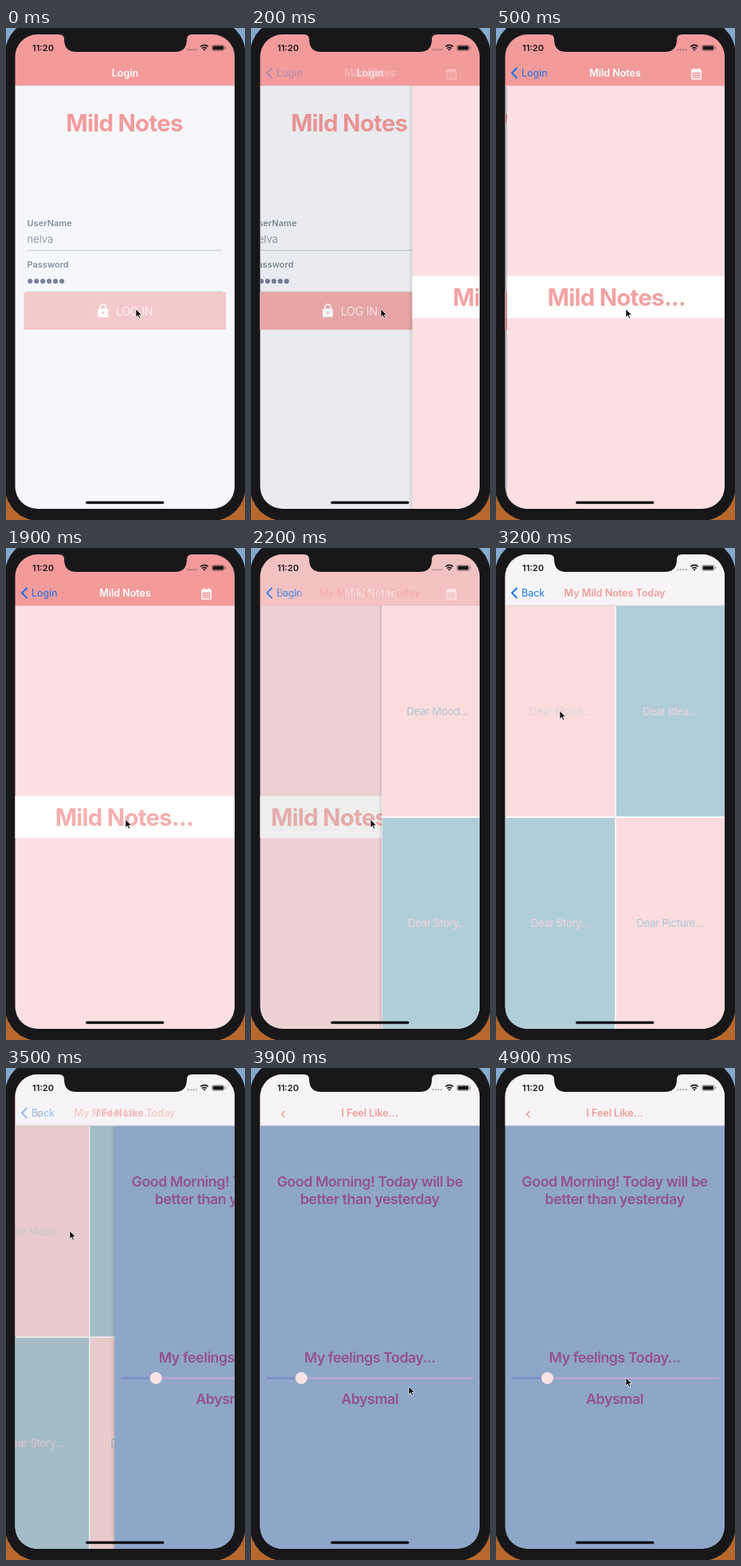
These frames come from a looping animation (300 by 618 pixels, 5 s). An HTML page:

```html
<!DOCTYPE html>
<html lang="en">
<head>
<meta charset="utf-8">
<title>Diary app</title>
<style>
html, body { margin: 0; width: 100%; height: 100%; overflow: hidden; background: #17171a; }
svg { display: block; width: 300px; height: 618px; font-family: Inter, "Liberation Sans", sans-serif; }
.mid { text-anchor: middle; }
.bold { font-weight: 600; }
.bar { font-size: 12.5px; }
.big { font-size: 29.4px; font-weight: 700; letter-spacing: -.025em; fill: #f39b9b; }
.label { font-size: 11px; font-weight: 600; fill: #82909c; }
.tile { font-size: 13.25px; letter-spacing: -.3px; text-anchor: middle; }
.feel { font-size: 17.8px; font-weight: 600; letter-spacing: -.024em; text-anchor: middle; fill: #935290; }
</style>
</head>
<body>
<svg viewBox="0 0 300 618">
  <defs>
    <linearGradient id="wall" x2="0" y2="1">
      <stop offset="0" stop-color="#86a9d0"/><stop offset=".5" stop-color="#665a60"/><stop offset="1" stop-color="#b9682c"/>
    </linearGradient>
    <linearGradient id="shade">
      <stop offset="0" stop-opacity="0"/><stop offset="1" stop-opacity=".12"/>
    </linearGradient>
    <clipPath id="screen"><rect x="11.5" y="8" width="275.5" height="596" rx="28"/></clipPath>
  </defs>

  <rect width="300" height="618" fill="url(#wall)"/>
  <rect x="-1" y="-10" width="301.5" height="629" rx="42" fill="#17171a"/>

  <g clip-path="url(#screen)">
    <g class="page">
      <rect x="11" y="72" width="277" height="532" fill="#f6f7fc"/>
      <text class="big mid" x="148.5" y="130">Mild Notes</text>
      <text class="label" x="26.5" y="249">UserName</text>
      <text x="26.5" y="270" font-size="13" font-weight="300" fill="#7a8592">nelva</text>
      <text class="label" x="26.5" y="301">Password</text>
      <g id="dots" fill="#7b809f"></g>
      <path d="M26 279.3H272M26 331.3H272" stroke="#c3c7ce" stroke-width=".9"/>
      <rect x="22.5" y="332" width="253.5" height="47" fill="#f6f7fc"/>
      <g id="button">
        <rect x="22.5" y="332" width="253.5" height="47" fill="#f39b9b"/>
      </g>
      <path d="M118.2 353v-2.4a3.5 3.5 0 0 1 7 0v2.4" fill="none" stroke="#fff" stroke-width="1.6"/>
      <rect x="115.3" y="352.3" width="12.8" height="11" rx="1.4" fill="#fff"/>
      <circle cx="121.7" cy="357.8" r="1.5" fill="#f9bfc0"/>
      <text x="138" y="361" font-size="14.4" font-weight="300" letter-spacing="-.3" fill="#fff">LOG IN</text>
      <rect class="dim" x="11" y="72" width="277" height="532"/>
    </g>

    <g class="page">
      <rect x="6" y="72" width="5.5" height="532" fill="url(#shade)"/>
      <rect x="11" y="72" width="277" height="532" fill="#fde0e4"/>
      <rect x="11" y="311.5" width="277" height="53" fill="#fff"/>
      <text id="greeting" class="big mid" x="148.5" y="349">Mild Notes...</text>
      <rect class="dim" x="11" y="72" width="277" height="532"/>
    </g>

    <g class="page">
      <rect x="6" y="72" width="5.5" height="532" fill="url(#shade)"/>
      <rect x="11" y="72" width="277" height="532" fill="#fff"/>
      <path d="M11.5 73H149.3V337.3H11.5ZM150.8 339H288V604H150.8Z" fill="#fddcde"/>
      <path d="M150.8 73H288V337.3H150.8ZM11.5 339H149.3V604H11.5Z" fill="#b0ced9"/>
      <text id="mood" class="tile" x="80.5" y="210" fill="#a5c8d8">Dear Mood...</text>
      <text class="tile" x="218.5" y="210" fill="#f4d5da">Dear Idea...</text>
      <text class="tile" x="80.5" y="476" fill="#f4d5da">Dear Story...</text>
      <text class="tile" x="218.5" y="476" fill="#a5c8d8">Dear Picture...</text>
      <rect class="dim" x="11" y="72" width="277" height="532"/>
    </g>

    <g class="page">
      <rect x="6" y="72" width="5.5" height="532" fill="url(#shade)"/>
      <rect x="11" y="72" width="277" height="532" fill="#8ea6c8"/>
      <text class="feel" x="149" y="149">Good Morning! Today will be</text>
      <text class="feel" x="149" y="170.5">better than yesterday</text>
      <text class="feel" x="149" y="370">My feelings Today...</text>
      <text class="feel" x="149" y="421.5">Abysmal</text>
      <path d="M20.5 389.5H278.5" stroke="#b3a6d5" stroke-width="3" stroke-linecap="round"/>
      <path d="M20.5 389.5H60" stroke="#7d90ca" stroke-width="3" stroke-linecap="round"/>
      <circle id="knob" cy="389.5" r="7.5" fill="#fde4e4"/>
    </g>

    <rect x="11" y="8" width="277" height="64.5" fill="#f39b9b"/>
    <g id="lightBar">
      <rect x="11" y="8" width="277" height="64.5" fill="#f6f4f6"/>
      <path d="M11 72.2H288" stroke="#c9c5c9" stroke-width=".6"/>
    </g>

    <g class="head bar">
      <text class="bold mid" x="149.5" y="60.5" fill="#fff">Login</text>
    </g>
    <g class="head bar">
      <path d="M26.5 50L20 56.5L26.5 63" fill="none" stroke="#1670e8" stroke-width="2"/>
      <text x="32" y="61" fill="#1670e8">Login</text>
      <text class="bold mid" x="149.5" y="60.5" fill="#fff">Mild Notes</text>
      <rect x="245.8" y="52.5" width="11.5" height="11.5" rx="1" fill="none" stroke="#fff" stroke-width="1.4"/>
      <path d="M245.8 54.3H257.3" stroke="#fff" stroke-width="3"/>
      <path d="M248.5 50.5V54M254.6 50.5V54" stroke="#fff" stroke-width="1.4"/>
      <path d="M248 58.3H256M248 61.2H256" stroke="#fff" stroke-width="1.6" stroke-dasharray="1.8 1"/>
    </g>
    <g class="head bar">
      <path d="M26.5 50L20 56.5L26.5 63" fill="none" stroke="#1979ea" stroke-width="2"/>
      <text x="32" y="61" fill="#1979ea">Back</text>
      <text class="bold mid" x="149" y="60.5" fill="#f39b9b">My Mild Notes Today</text>
    </g>
    <g class="head bar">
      <path d="M42.3 54.3L38.5 58.2L42.3 62.1" fill="none" stroke="#f2958f" stroke-width="1.3"/>
      <text class="bold mid" x="149" y="60.5" fill="#f39b9b">I Feel Like...</text>
    </g>

    <text class="bold" x="33" y="28.5" font-size="11" fill="#17171a">11:20</text>
    <path d="M227.5 27.3H240" stroke="#17171a" stroke-opacity=".35" stroke-width="1.9" stroke-dasharray="1.9 1.5"/>
    <g fill="none" stroke="#17171a" stroke-width="1.6">
      <path d="M244.2 23.4Q249 19.2 253.8 23.4M246.1 25.6Q249 23 251.9 25.6"/>
      <rect x="258.5" y="21.5" width="15.5" height="7" rx="2" stroke-width=".7" stroke-opacity=".5"/>
    </g>
    <path d="M247.4 27L249 28.7L250.6 27Q249 25.6 247.4 27Z" fill="#17171a"/>
    <rect x="259.6" y="22.6" width="13.3" height="4.8" rx="1" fill="#17171a"/>
    <path d="M275.4 23.8V26.2" stroke="#17171a" stroke-opacity=".5"/>
    <rect x="100" y="594.4" width="98.5" height="3.4" rx="1.7" fill="#08080c"/>
  </g>

  <path d="M66 7H234V8Q227 8 227 14Q227 30 212 30H88Q73 30 73 14Q73 8 66 8Z" fill="#17171a"/>
  <path id="cursor" d="M0 0V10.2L2.4 8L4 11.8L5.7 11.1L4.1 7.4H7.3Z" fill="#0a0a0a" stroke="#fff" stroke-width=".7"/>
</svg>

<script>
const LOOP = 5000, STEP = 100, WIDTH = 276;
const PUSH_STARTS = [155, 2133, 3415], PUSH_TIME = 500;
const all = selector => [...document.querySelectorAll(selector)];
const byId = id => document.getElementById(id);
const pages = all('.page'), heads = all('.head'), dims = all('.dim');
const [button, greeting, mood, knob, lightBar, cursor] =
  ['button', 'greeting', 'mood', 'knob', 'lightBar', 'cursor'].map(byId);

byId('dots').innerHTML = Array.from({ length: 6 }, (_, i) =>
  `<circle cx="${30.3 + i * 7.95}" cy="318" r="3.1"/>`).join('');

// Cubic Bezier ease (.2833, .99, .3183, .99)
function ease(x) {
  if (x <= 0) return 0;
  if (x >= 1) return 1;
  const curve = (s, a, b) => 3 * (1 - s) * s * ((1 - s) * a + s * b) + s ** 3;
  let low = 0, high = 1;
  for (let i = 0; i < 20; i++) {
    const s = (low + high) / 2;
    if (curve(s, .2833, .3183) < x) low = s; else high = s;
  }
  return curve(low, .99, .99);
}

// Linear interpolation between [time, value] keys
function track(t, keys) {
  const next = keys.findIndex(key => key[0] > t);
  if (next === 0) return keys[0][1];
  if (next < 0) return keys[keys.length - 1][1];
  const [t0, v0] = keys[next - 1], [t1, v1] = keys[next];
  return v0 + (v1 - v0) * (t - t0) / (t1 - t0);
}

const cursorX = [[700, 163], [1100, 150], [2300, 150], [2500, 132.5], [2600, 128], [3000, 80],
  [3500, 80], [3900, 198], [4100, 198], [4500, 163]];
const cursorY = [[700, 353], [1100, 341], [2300, 341], [2500, 171], [2600, 172], [3000, 204.5],
  [3500, 204.5], [3900, 400], [4100, 400], [4500, 389]];

function render(t) {
  const pushed = [1, ...PUSH_STARTS.map(start => ease((t - start) / PUSH_TIME)), 0];
  pages.forEach((page, i) => {
    const shown = pushed[i], covered = pushed[i + 1];
    page.setAttribute('transform', `translate(${WIDTH * (1 - shown) - .3 * WIDTH * covered})`);
    page.style.display = shown > 0 && covered < 1 ? '' : 'none';
    heads[i].style.opacity = shown * (1 - covered);
    if (dims[i]) dims[i].style.opacity = .15 * covered;
  });
  lightBar.style.opacity = pushed[2];
  button.style.opacity = track(t, [[0, .5], [100, .6], [300, 1]]);
  greeting.style.opacity = track(t, [[500, .92], [1800, .92], [1900, .8], [2000, .5], [2100, .5], [2300, .92]]);
  mood.style.opacity = track(t, [[3000, 1], [3200, .35], [3500, .35], [3700, 1]]);
  knob.setAttribute('cx', track(t, [[3900, 63], [4500, 64.5]]));
  cursor.setAttribute('transform', `translate(${track(t, cursorX)} ${track(t, cursorY)})`);
}

function frame() {
  render(Math.floor(performance.now() % LOOP / STEP) * STEP);
  requestAnimationFrame(frame);
}
frame();
</script>
</body>
</html>
```
